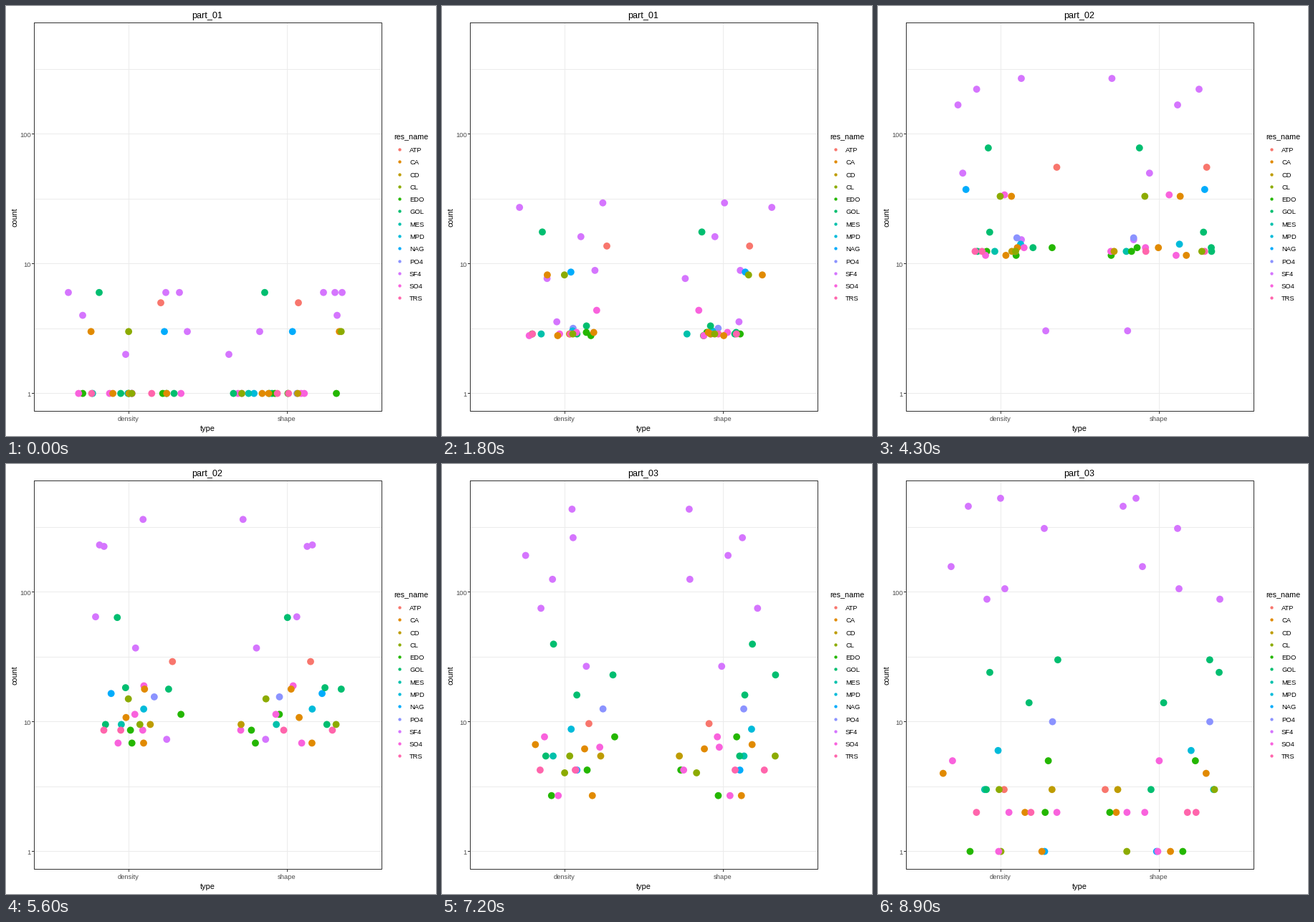
Recreate the animation shown at these times as a matplotlib script. Size 600 px wide and 600 px high, loop 9000 ms.

```python
import matplotlib.pyplot as plt
import numpy as np
from matplotlib.animation import FuncAnimation

plt.rcParams["font.family"] = "Liberation Sans"

FRAMES, STEP_MS = 90, 100
KEYS = [0, 45, 89]            # frames on which each part is reached
PX = 0.72                     # points per pixel at 100 dpi
Y_ONE, DECADE = 540.6, 181    # log axis in pixels
CENTERS = {"density": 171.5, "shape": 392.5}
JITTER = 82

COLORS = {
    "ATP": "#F8766D", "CA": "#E18A00", "CD": "#BE9C00", "CL": "#8CAB00",
    "EDO": "#24B700", "GOL": "#00BE70", "MES": "#00C1AB", "MPD": "#00BBDA",
    "NAG": "#00ACFC", "PO4": "#8B93FF", "SF4": "#D575FE", "SO4": "#F962DD",
    "TRS": "#FF65AC",
}

rng = np.random.default_rng(4)
xs, ys, colors = [], [], []


def add(name, counts, *paths):
    """One dot per type; the x path is jittered unless it is given."""
    paths = paths or [c + rng.uniform(-JITTER, JITTER, 3)
                      for c in CENTERS.values()]
    for path in paths:
        xs.append(path)
        ys.append(Y_ONE - DECADE * np.log10(counts))
        colors.append(COLORS[name])


# Leading residues: counts and x in the three parts
add("SF4", (6, 320, 528), (242, 198, 171), (443, 321, 360))
add("SF4", (6, 262, 157), (87, 140, 102), (469, 447, 369))
add("SF4", (3, 202, 309), (253, 105, 232), (354, 421, 418))
add("SF4", (2, 58, 88), (167, 116, 152), (311, 382, 477))
add("SF4", (6, 16, 458), (223, 199, 126), (459, 352, 342))
add("SF4", (4, 3, 106), (107, 240, 177), (462, 343, 420))
add("GOL", (6, 88, 24), (130, 155, 156), (361, 365, 476))
add("ATP", (5, 62, 3), (216, 251, 176), (408, 461, 317))

# Medium residues
add("SO4", (1, 40, 2))
add("NAG", (3, 42, 1))
add("GOL", (1, 15, 30))
add("CA", (3, 37, 2))
add("CL", (3, 37, 1))

# The crowd starts at 1, peaks together and falls to its last count
LAST = {"PO4": [10], "MPD": [6], "MES": [3], "GOL": [14, 3], "EDO": [5, 2, 1],
        "SO4": [5, 2, 1], "CD": [3], "TRS": [2, 2], "CA": [4, 1], "CL": [3]}
for name, ends in LAST.items():
    for end in ends:
        add(name, (1, 13 + end // 2, end))

xs, ys = np.transpose(xs), np.transpose(ys)

fig = plt.figure(figsize=(6, 6), dpi=100, facecolor="white")
ax = fig.add_axes([0, 0, 1, 1])
ax.set(xlim=(0, 600), ylim=(600, 0))
ax.axis("off")


def line(x, y, color, z=1):
    ax.plot(x, y, color=color, lw=PX, snap=False, solid_capstyle="projecting",
            solid_joinstyle="miter", zorder=z)


def label(x, y, s, size, color="black", ha="center", **kw):
    return ax.text(x, y, s, fontsize=size * PX, color=color, ha=ha,
                   va="baseline", **kw)


def dots(x, y, c, diameter, z):
    return ax.scatter(x, y, s=(diameter * PX) ** 2, c=c, linewidths=0,
                      zorder=z)


L, R, T, B = 39.5, 524.5, 23.5, 565.5
GRID, DARK, TICK_TEXT = "#EBEBEB", "#333333", "#4D4D4D"

for y in (88.5, 269.5, 450.5):
    line([L, R], [y, y], GRID)
for y, s in ((178.5, "100"), (359.5, "10"), (540.5, "1")):
    line([L, R], [y, y], GRID)
    line([L - 3, L], [y, y], DARK)
    label(34.5, y + 4.3, s, 9.3, TICK_TEXT, "right")
for s, x in CENTERS.items():
    line([x, x], [T, B], GRID)
    line([x, x], [B, B + 3], DARK)
    label(x - 0.8, 579, s, 9.4, TICK_TEXT)
line([L, R, R, L, L], [T, T, B, B, T], DARK, 4)

label(281, 593, "type", 11)
label(16, 295, "count", 10.8, rotation=90, rotation_mode="anchor")
title = label(281, 17, "part_01", 12.6)

label(541, 185, "res_name", 10.8, ha="left")
for i, (name, color) in enumerate(COLORS.items()):
    y = 200 + 17.28 * i
    dots([549], [y], color, 4.3, 2)
    label(563, y + 4, name, 9.4, ha="left")

points = dots(xs[0], ys[0], colors, 9.8, 3)


def update(i):
    part = 0 if i < KEYS[1] else 1
    t = (i - KEYS[part]) / (KEYS[part + 1] - KEYS[part])
    x = xs[part] + t * (xs[part + 1] - xs[part])
    y = ys[part] + t * (ys[part + 1] - ys[part])
    points.set_offsets(np.column_stack([x, y]))
    title.set_text(f"part_{part + 1 + (t >= 0.5):02d}")
    return points, title


anim = FuncAnimation(fig, update, frames=FRAMES, interval=STEP_MS,
                     repeat=True, repeat_delay=0)
plt.show()
```
